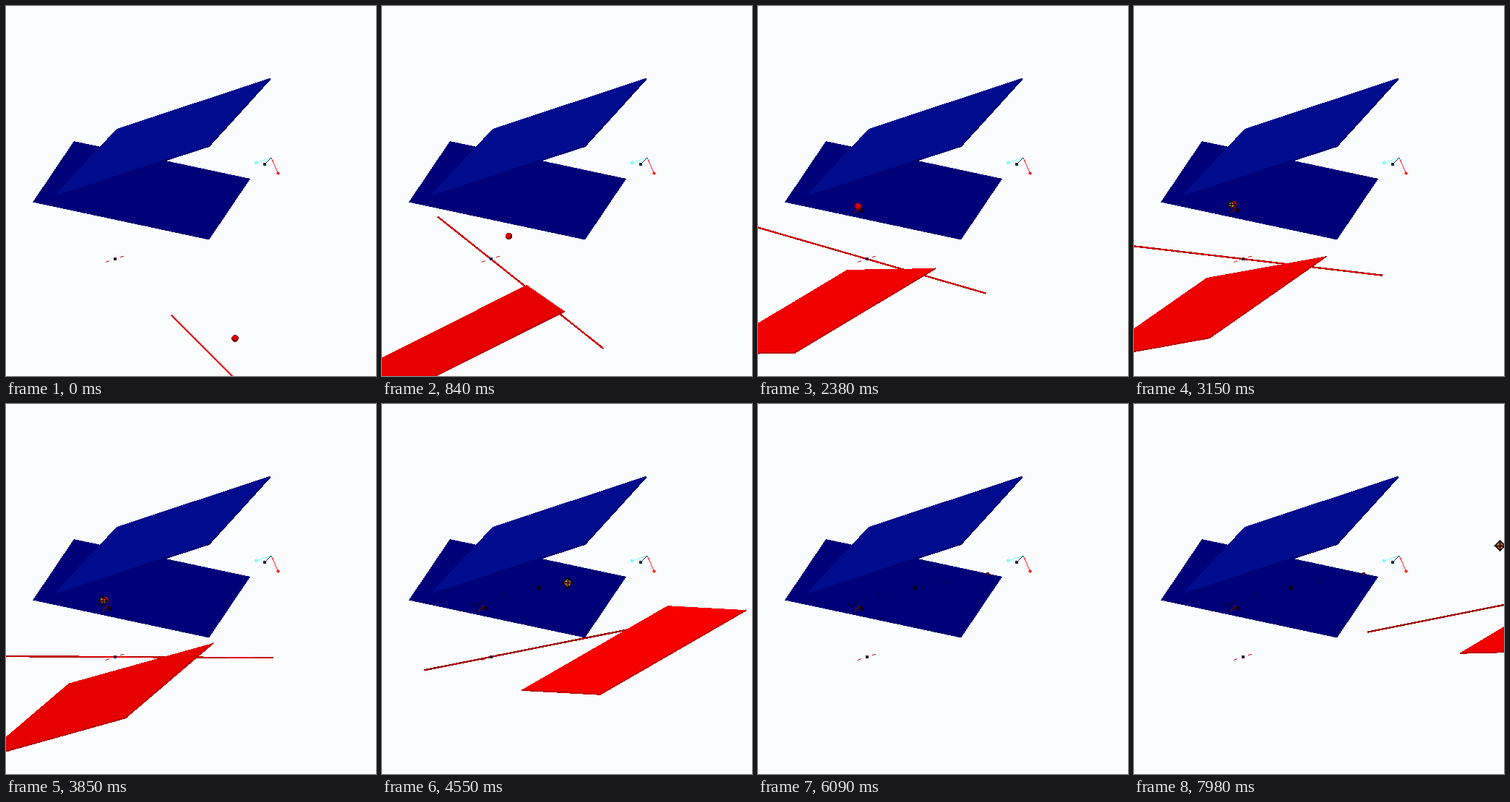
Write an HTML page that moves like this. It is 512 by 512 pixels and loops after 8000 ms.

```html
<!DOCTYPE html>
<html>
<head>
<meta charset="utf-8">
<style>
html, body { margin: 0; width: 100%; height: 100%; overflow: hidden; background: #fbfcfe; }
svg { display: block; }
</style>
</head>
<body>
<svg id="stage" width="512" height="512" viewBox="0 0 512 512" shape-rendering="crispEdges"></svg>
<script>
const stage = document.getElementById('stage');
const LOOP = 8000, STEP = 70;
const ENTER = 1050, SWEEP = 2800, LEAVE = 700, DRIFT = 0.288;
const GONE = 6090, RETURN = 7210;
const PIVOT = [150.5, 350];
// Projected axes of the tilted plane in which the rod swings and the plate turns
const U = [121, -1], V = [-203, 121], DEPTH = 0.965;

const clamp = v => Math.max(0, Math.min(1, v));
const rgb = v => `rgb(${Math.round(v)},0,0)`;

function inPlane(degrees) {
  const a = degrees * Math.PI / 180, c = Math.cos(a), s = Math.sin(a);
  return [c * U[0] + s * V[0], c * U[1] + s * V[1]];
}

// Slide in along the rod, sweep about the pivot, swing over and drift away
function pose(t) {
  const before = 1 - clamp(t / ENTER);
  const sweep = clamp((t - ENTER) / SWEEP);
  const leave = clamp((t - ENTER - SWEEP) / LEAVE);
  const drift = Math.max(0, t - ENTER - SWEEP - LEAVE) * DRIFT;
  const glide = (a, b, c, ease = 1) => a + (b - a) * sweep ** ease + (c - b) * leave;
  const move = (x, y) => [x + before * 177 + drift, y + before * 177 - drift * 0.205];
  return {
    leave,
    swing: glide(18.6, 0.8, -16, 1.2) + before * 2,
    turn: glide(18, -27, 3.3, 1.2) - drift * 0.017,
    scale: 1 - drift * 0.0003,
    from: glide(-145, -190, -94) + before * 255 + drift * 1.08,
    to: glide(148, 220, 320, 1.5) + before * 255 + drift * 1.08,
    ball: move(glide(140, 137, 257), glide(283, 271.5, 247)),
    plate: move(glide(80, 126, 348.5, 2.5), glide(424.5, 410.5, 340.5, 2.5)),
    light: 230 + 10 * Math.sin(Math.PI * sweep) + 16 * leave - drift * 0.02,
    glow: glide(205, 205, 165) + before * 40
  };
}

const shape = (color, ...points) => `<polygon points="${points.join(' ')}" fill="${color}"/>`;
const line = (color, width, ...points) =>
  `<polyline points="${points.join(' ')}" fill="none" stroke="${color}" stroke-width="${width}"/>`;
const dot = (color, x, y, r) => `<circle cx="${x}" cy="${y}" r="${r}" fill="${color}"/>`;

function scenery() {
  const hub = [367, 210];
  const arm = (color, x, y) => line(color, 1, hub, [x, y]) + dot(color, x, y, 2.3);
  return shape('#000078', [94, 187], [338, 239], [281, 323.5], [37, 271.5])
    + shape('#000c8e', [153, 170], [366.5, 99.5], [281, 193], [67, 262.5])
    + line('#00006e', 2, [160, 233], [281, 194], [366, 100.5])
    + arm('#7ff', 346, 217) + arm('#012a3a', 358, 219) + arm('#f22', 376.5, 231.5);
}

function pivot() {
  return line('#c01020', 1, [138, 354.5], [143, 352.5])
    + line('#c01020', 1, [158, 347.5], [163, 346])
    + dot('#38103c', 151, 350, 2.4);
}

// Marks left on the lower plane where the ball has passed
function trail(t) {
  let out = '';
  if (t >= ENTER) out += dot('#100020', 144, 283, 3.3);
  if (t >= ENTER + SWEEP / 3) out += line('#4a0a10', 2, [133, 287], [141, 279]);
  if (t < ENTER + SWEEP) return out;
  out += line('#000048', 2, [124, 275], [131, 280], [141, 270]);
  const reach = pose(Math.min(t, GONE)).ball[0];
  for (const x of [168, 217, 257, 318]) {
    const color = x > 300 ? '#501020' : x === 217 ? '#000028' : '#00005a';
    if (x < reach) out += dot(color, x, 263.5 - (x - 168) * 0.19, x === 217 ? 3.5 : 2.3);
  }
  return out;
}

function rod(p) {
  const [dx, dy] = inPlane(p.swing), size = Math.hypot(dx, dy);
  const at = d => [PIVOT[0] + d * dx / size, PIVOT[1] + d * dy / size];
  const ends = [at(p.from), at(p.to)];
  return line(rgb(p.glow * 0.8), 2.4, ...ends) + line(rgb(p.glow * 1.1), 1.2, ...ends);
}

function plate(p) {
  const a = inPlane(p.turn), b = inPlane(p.turn + 90);
  const corner = (i, j) => [0, 1].map(k => p.plate[k] + (i * a[k] + j * b[k] * DEPTH) * p.scale / 2);
  const right = corner(1, -1), low = corner(1, 1), left = corner(-1, 1);
  return shape(rgb(p.light), corner(-1, -1), right, low, left)
    + line(rgb(p.light * 0.78), 2, right, low, left);
}

function target(x, y, r) {
  const diamond = (color, s) => shape(color, [x, y - s], [x + s, y], [x, y + s], [x - s, y]);
  const h = r * 0.3;
  let out = diamond('#000', r) + diamond('#b04434', r - 2);
  for (const i of [-h, h]) out += dot('#50a048', x + i, y + i, 1.2);
  return out + line('#000', 1, [x - r, y], [x + r, y]) + line('#000', 1, [x, y - r], [x, y + r]);
}

function ball(p, t) {
  const [x, y] = p.ball;
  const aimed = t >= ENTER && t < 1900 || t >= 3100;
  return dot('#800000', x, y, 4.8) + dot('#d80000', x - 0.5, y - 1, 3.6)
    + (aimed ? target(x - 3 * (1 - p.leave), y + 0.5, 6.5 + 1.5 * p.leave) : '');
}

function draw(now) {
  const t = Math.floor(now % LOOP / STEP) * STEP;
  // After a wait off stage everything comes back the same way
  const p = pose(t < RETURN ? Math.min(t, GONE) : GONE - (t - RETURN) * 0.875);
  stage.innerHTML = scenery() + trail(t) + rod(p) + pivot() + plate(p) + ball(p, t);
}

let start;
function tick(now) {
  start ??= now;
  draw(now - start);
  requestAnimationFrame(tick);
}
draw(0);
requestAnimationFrame(tick);
</script>
</body>
</html>
```
